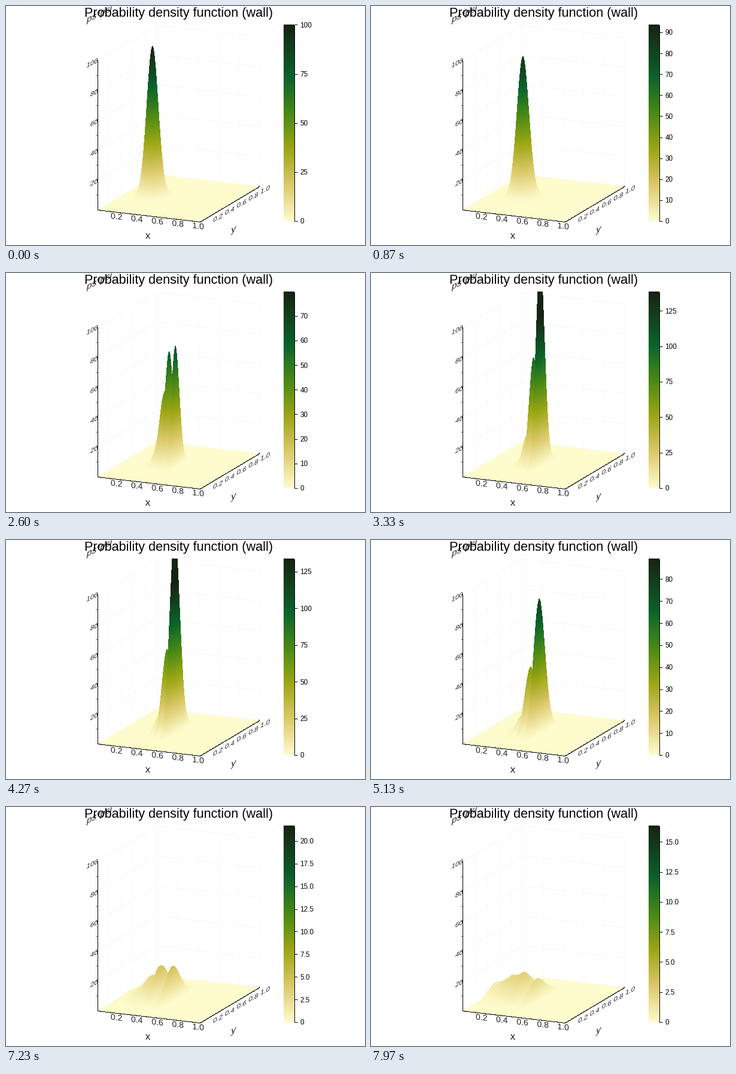
Animation of 600 by 400 pixels, one loop 8000 ms. Source, as a matplotlib script:

```python
import numpy as np
import matplotlib.pyplot as plt
from matplotlib.animation import FuncAnimation
from matplotlib.collections import LineCollection
from matplotlib.colors import LinearSegmentedColormap
from matplotlib.patches import PathPatch
from matplotlib.textpath import TextPath
from matplotlib.transforms import Affine2D

W, H, DPI = 600, 400, 100
FRAMES = 240
PX = 72 / DPI  # points per pixel
FONT = "Liberation Sans"

# Screen projection of the unit box
O = np.array([153.4, 341.0])
EX = np.array([171.0, 20.0])
EY = np.array([99.0, -59.0])
ZPX = 2.5
TOP = 31

# Wave packet between hard walls at x = 0 and x = 0.5
SIGMA, K, TAU, X0, WALL = 0.05, 40.3, 99.0, 0.245, 0.5
V = 2 * SIGMA**2 * K / TAU
XS = np.linspace(0, 1, 801)

speed = LinearSegmentedColormap.from_list("speed", [
    (0, "#fefccd"), (2 / 11, "#ddc96a"), (4 / 11, "#9da715"),
    (6 / 11, "#4b8a14"), (8 / 11, "#0b642c"), (1, "#172312")], 512)


def project(x, y, z=0):
    return O + x * EX + y * EY - np.array([0, ZPX * z])


def packet(x, n):
    c = 1 + 1j * n / TAU
    return np.exp(-(x - X0 - V * n)**2 / (4 * SIGMA**2 * c)
                  + 1j * K * (x - X0)) / np.sqrt(c)


def density_x(n):
    """Sum of mirror images, so the wave vanishes at both walls."""
    psi = sum(packet(XS + m, n) - packet(m - XS, n) for m in (-1, 0, 1))
    return np.where(XS <= WALL, 100 * np.abs(psi)**2, 0)


def density_y(y, n):
    spread = 1 + (n / TAU)**2
    return np.exp(-(y - 0.5)**2 / (2 * SIGMA**2 * spread)) / np.sqrt(spread)


# Sight lines: each pixel column is sampled from front to back
SAMPLES = 300
cols = np.arange(153, 424)
rows = np.arange(TOP, 362)
mid = cols + 0.5
near = np.clip((mid - O[0] - EX[0]) / EY[0], 0, 1)
far = np.clip((mid - O[0]) / EY[0], 0, 1)
gy = near[:, None] + (far - near)[:, None] * np.linspace(0, 1, SAMPLES)
gx = (mid[:, None] - O[0] - EY[0] * gy) / EX[0]
base = O[1] + EX[1] * gx + EY[1] * gy
STRIDE = 2000.0
shift = STRIDE * np.arange(len(cols))[:, None]
row_y = np.broadcast_to(rows + 0.5, (len(cols), len(rows)))
queries = (shift - row_y).ravel()
col_id = np.arange(len(cols))[:, None]


def render(fx, n):
    """Visible height at every pixel, masked where nothing is hit."""
    h = np.interp(gx, XS, fx) * density_y(gy, n)
    sy = base - ZPX * h
    ridge = -np.minimum.accumulate(sy, axis=1) + shift
    hit = np.searchsorted(ridge.ravel(), queries).reshape(row_y.shape)
    hit = hit - col_id * SAMPLES
    miss = (hit <= 0) | (hit >= SAMPLES)
    i = np.clip(hit, 1, SAMPLES - 1)
    y0, y1 = sy[col_id, i - 1], sy[col_id, i]
    gap = np.where(np.abs(y0 - y1) < 1e-9, 1, y0 - y1)
    f = np.clip((y0 - row_y) / gap, 0, 1)
    z = h[col_id, i - 1] * (1 - f) + h[col_id, i] * f
    return np.ma.array(z, mask=miss).T


fig = plt.figure(figsize=(W / DPI, H / DPI), dpi=DPI, facecolor="white")
ax = fig.add_axes([0, 0, 1, 1])
ax.axis("off")


def add_lines(segments, color, z, smooth=True):
    lines = LineCollection(segments, colors=color, linewidths=PX, zorder=z)
    lines.set_antialiased(smooth)
    ax.add_collection(lines)
    return lines


def add_label(text, x, y, size, slope, lean=0.0):
    """Text centred at (x, y), sheared to lie along an axis."""
    path = TextPath((0, 0), text, size=size, prop={"family": FONT})
    box = path.get_extents()
    place = Affine2D().translate(-(box.x0 + box.x1) / 2,
                                 -(box.y0 + box.y1) / 2)
    place += Affine2D.from_values(1, slope, lean, -1, x, y)
    ax.add_patch(PathPatch(path.transformed(place), facecolor="#222222",
                           linewidth=0, zorder=5))


# Faint grid on the two back walls
grid = []
for v in np.arange(6) / 5:
    grid.append([project(0, 0, 100 * v), project(0, 1, 100 * v),
                 project(1, 1, 100 * v)])
    grid.append([project(0, v), project(0, v, 100)])
    grid.append([project(v, 1), project(v, 1, 100)])
add_lines(grid, "#f9f9f9", 1)

# The floor hides half of the axis lines around it
add_lines([[project(0, 0), project(1, 0), project(1, 1)]], "black", 2, False)
upright = [[project(0, 0, 100), project(0, 0)]]
for i in range(1, 11):
    p = project(0, 0, 10 * i)
    upright.append([p, p - (2 if i % 2 else 3, 0)])
add_lines(upright, "black", 4)

X_SLOPE, Y_SLOPE, LEAN = EX[1] / EX[0], -0.48, 0.18
for v in np.arange(1, 6) / 5:
    x, y = project(v, 0)
    add_label(f"{v:.1f}", x - 3, y + 7, 14, X_SLOPE)
    x, y = project(1, v)
    add_label(f"{v:.1f}", x + 10, y + 5, 11.5, Y_SLOPE, LEAN)
    text = f"{100 * v:.0f}"
    x, y = project(0, 0, 100 * v)
    add_label(text, x - 3 * len(text), y + 4, 11.5, Y_SLOPE, LEAN)
add_label("x", 237, 385, 17, X_SLOPE)
add_label("y", 380, 376, 16, Y_SLOPE, LEAN)
add_label("ps*psi", 156, 14, 15.5, Y_SLOPE, LEAN)

ax.text(288.5, 18, "Probability density function (wall)", ha="center",
        va="baseline", family=FONT, fontsize=21.6 * PX, zorder=6)

surface = ax.imshow(np.zeros((len(rows), len(cols))), cmap=speed, vmin=0,
                    vmax=100, extent=(cols[0], cols[-1] + 1, 362, TOP),
                    aspect="auto", interpolation="nearest", zorder=3)

# Colour bar
BAR_TOP, BAR_BOTTOM, BAR_RIGHT = 31.5, 360.0, 482
ax.imshow(np.linspace(1, 0, 329)[:, None], cmap=speed, vmin=0, vmax=1,
          extent=(464, BAR_RIGHT, BAR_BOTTOM, BAR_TOP), aspect="auto",
          zorder=3)
add_lines([[(BAR_RIGHT, BAR_TOP), (BAR_RIGHT, BAR_BOTTOM)]], "black", 4)
ticks = add_lines([], "black", 4)
numbers = [ax.text(491.5, 0, "", va="center_baseline", fontsize=11.8 * PX,
                   family=FONT, zorder=5) for _ in range(12)]
ax.set_xlim(0, W)
ax.set_ylim(H, 0)


def tick_step(top):
    power = 10.0**np.floor(np.log10(top * 1.000001))
    lead = top / power
    return power * (1 if lead > 5 else 0.5 if lead > 2.5 else 0.25)


def update(n):
    fx = density_x(n)
    surface.set_data(render(fx, n))
    top = fx.max() * density_y(0.5, n)
    step = tick_step(top)
    places = 0 if step == int(step) else 1
    marks = []
    for i, label in enumerate(numbers):
        value = i * step
        if value > top * 1.000001:
            label.set_text("")
            continue
        y = BAR_BOTTOM - (BAR_BOTTOM - BAR_TOP) * value / top
        marks.append([(BAR_RIGHT, y), (487, y)])
        label.set_y(y)
        label.set_text(f"{value:.{places}f}" if i else "0")
    ticks.set_segments(marks)
    return [surface, ticks, *numbers]


anim = FuncAnimation(fig, update, frames=FRAMES, interval=8000 / FRAMES,
                     init_func=lambda: update(0), repeat=True,
                     repeat_delay=0, blit=False)
plt.show()
```
